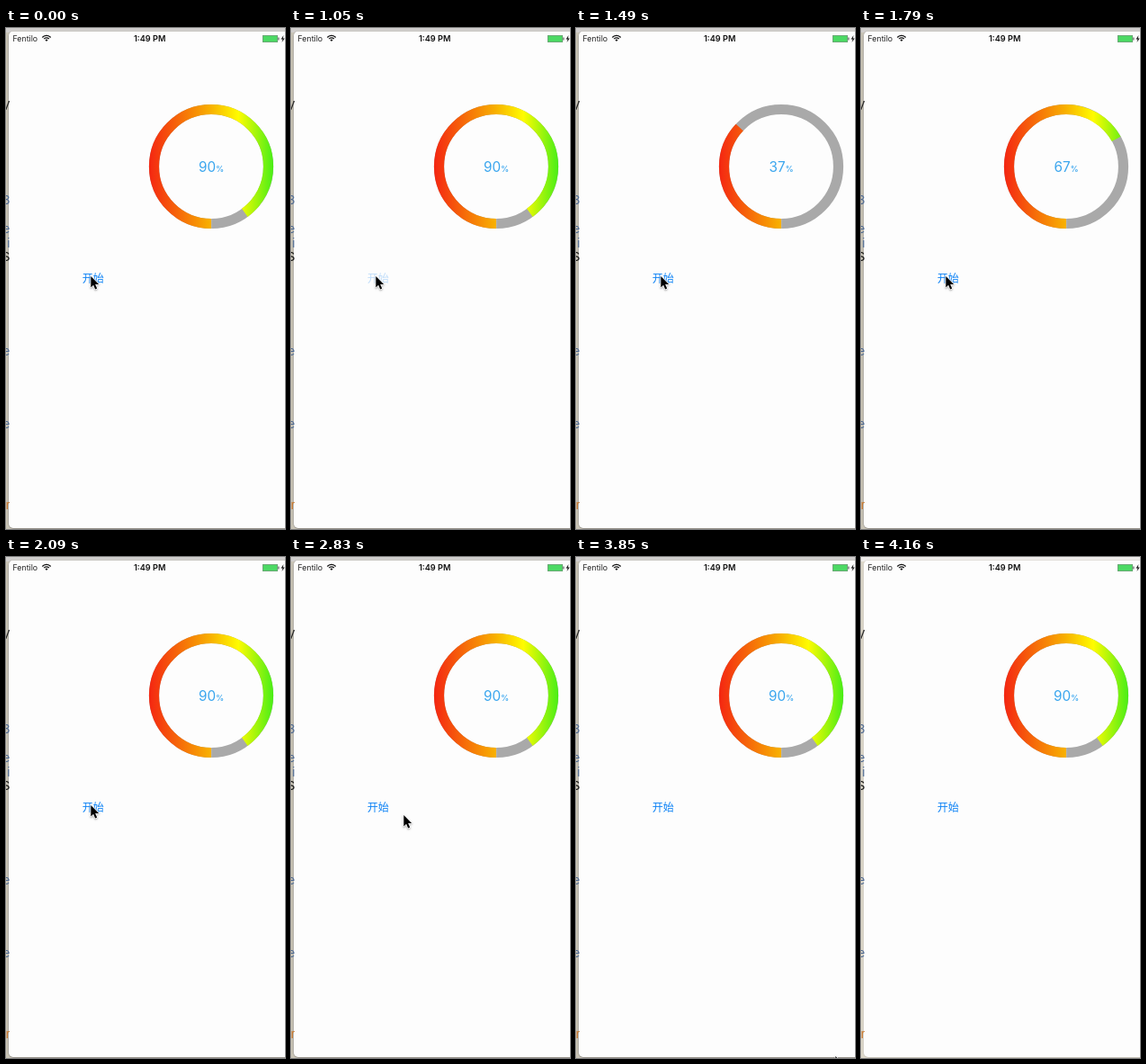
These frames come from a looping animation (310x557 px, 4260 ms). An HTML page with a canvas:

```html
<!DOCTYPE html>
<html lang="zh">
<head>
<meta charset="utf-8">
<title>Ring progress</title>
<style>
  html, body { margin: 0; width: 100%; height: 100%; overflow: hidden; background: #fdfdfd; }
  canvas { display: block; width: 310px; height: 557px; }
</style>
</head>
<body>
<canvas id="stage" width="310" height="557"></canvas>
<script>
const ctx = document.getElementById('stage').getContext('2d');
const W = 310, H = 557, LOOP = 4260;
const TAP = 1045, STEP = 147.4;   // first refresh and the pace of the rest, in ms
const LAST = 21;                  // refresh on which the window loses its shadow
const TAU = Math.PI * 2;
const SANS = 'Inter, Roboto, sans-serif';
const HAN = '"Noto Sans CJK SC", "Noto Sans CJK", sans-serif';
const RING = { x: 228, y: 154, r: 63.5, width: 11.2 };

// Pointer key points: refresh, x, y, ease-in power
const PATH = [
  [8, 92, 275], [11, 163, 298, 2], [12, 123, 286], [15, 96, 280],
  [16, 105, 291], [17, 213, 414], [18, 216, 465], [19, 286, 554]
];

const lerp = (a, b, k) => a + (b - a) * k;

function text(str, x, y, font, color, align = 'left') {
  ctx.font = font;
  ctx.fillStyle = color;
  ctx.textAlign = align;
  ctx.fillText(str, x, y);
}

function polygon(points) {
  ctx.beginPath();
  points.forEach(([x, y]) => ctx.lineTo(x, y));
  ctx.closePath();
}

function panel(x, y, h, radius, color) {
  ctx.fillStyle = color;
  ctx.beginPath();
  ctx.roundRect(x, y, W + 10, h, radius);
  ctx.fill();
}

function drawWindow(bright) {
  ctx.fillStyle = bright ? '#ddd8ca' : '#c9c4b6';
  ctx.fillRect(0, 0, W, H);
  ctx.fillStyle = bright ? '#eeecea' : '#d0cecd';
  ctx.fillRect(0, 0, W, 5);
  panel(2.4, 3, H - 3, 6, bright ? '#c6c2b8' : '#98948c');
  panel(3, 3.6, H - 4.6, 5, '#fdfdfd');

  // Slivers of the page behind
  const blue = '#4a6690';
  const slivers = [['V', 91, '#222'], ['3', 196, blue], ['e', 228, blue], ['i', 244, blue],
    ['S', 259, '#111'], ['e', 364, blue], ['e', 445, blue], ['r', 535, '#cc7a30']];
  ctx.save();
  ctx.beginPath();
  ctx.rect(0, 0, 4, H);
  ctx.clip();
  for (const [ch, y, color] of slivers) text(ch, 4.3, y, '14px "Liberation Sans", sans-serif', color, 'right');
  ctx.restore();
}

function drawStatusBar() {
  text('Fentilo', 7.5, 15, '8.8px ' + SANS, '#222');
  text('1:49 PM', 159.7, 15, '600 9.2px ' + SANS, '#111', 'center');

  // Signal fan
  const fan = r => ctx.arc(45, 14.6, r, -Math.PI * 0.77, -Math.PI * 0.23);
  ctx.strokeStyle = ctx.fillStyle = '#111';
  ctx.lineWidth = 1.3;
  for (const r of [3.7, 6.2]) {
    ctx.beginPath();
    fan(r);
    ctx.stroke();
  }
  ctx.beginPath();
  ctx.moveTo(45, 15);
  fan(2);
  ctx.fill();

  // Battery
  ctx.fillStyle = '#4cd964';
  ctx.fillRect(285, 8, 17, 8);
  ctx.strokeStyle = '#68a874';
  ctx.lineWidth = 1;
  ctx.strokeRect(285.5, 8.5, 16, 7);
  ctx.fillStyle = '#444';
  ctx.fillRect(302.4, 10.5, 1, 3);
  ctx.fillStyle = '#111';
  polygon([[308.5, 8], [305.5, 12.5], [307.5, 12.5], [306.5, 16], [309.7, 11.4], [307.7, 11.4]]);
  ctx.fill();
}

const rainbow = ctx.createLinearGradient(158, 0, 298, 0);
rainbow.addColorStop(0, '#f42412');
rainbow.addColorStop(0.5, '#f8b200');
rainbow.addColorStop(0.715, '#fffc00');
rainbow.addColorStop(1, '#44ee18');

function drawRing(percent) {
  const arc = (share, paint) => {
    ctx.beginPath();
    ctx.arc(RING.x, RING.y, RING.r, TAU / 4, TAU / 4 + TAU * share);
    ctx.strokeStyle = paint;
    ctx.stroke();
  };
  ctx.lineWidth = RING.width;
  arc(1, '#a9a9a9');
  arc(percent / 100, rainbow);

  const big = '15.3px ' + SANS, small = '600 8.8px ' + SANS, blue = '#3ba6ee';
  ctx.font = big;
  const bigWidth = ctx.measureText(percent).width;
  ctx.font = small;
  const x = RING.x - (bigWidth + ctx.measureText('%').width) / 2;
  text(percent, x, 159.6, big, blue);
  text('%', x + bigWidth, 159.6, small, blue);
}

function drawButton(alpha) {
  ctx.globalAlpha = alpha;
  text('开始', 96.8, 282.5, '12px ' + HAN, '#0a80f5', 'center');
  ctx.globalAlpha = 1;
}

function pointerAt(step) {
  const next = PATH.findIndex(p => p[0] >= step);
  if (next <= 0) return PATH[0].slice(1);
  const [s0, x0, y0] = PATH[next - 1];
  const [s1, x1, y1, power = 1] = PATH[next];
  const k = ((step - s0) / (s1 - s0)) ** power;
  return [lerp(x0, x1, k), lerp(y0, y1, k)];
}

function drawPointer([x, y]) {
  ctx.save();
  ctx.translate(x + 2.3, y + 0.9);
  ctx.scale(0.88, 0.9);
  polygon([[0, 0], [0, 14], [3.2, 11], [5.5, 16.2], [7.8, 15.2], [5.5, 10.2], [10, 10]]);
  ctx.shadowColor = 'rgba(0,0,0,.35)';
  ctx.shadowBlur = 2;
  ctx.shadowOffsetY = 1;
  ctx.lineJoin = 'round';
  ctx.lineWidth = 1.6;
  ctx.strokeStyle = '#fff';
  ctx.stroke();
  ctx.shadowColor = 'transparent';
  ctx.fillStyle = '#000';
  ctx.fill();
  ctx.restore();
}

function draw(now) {
  const step = Math.floor((now % LOOP - TAP) / STEP);
  const bright = step >= LAST;
  const running = step >= 1 && !bright;

  drawWindow(bright);
  drawStatusBar();
  drawRing(running ? Math.min(90, 15 * step - 8) : 90);
  drawButton(step < 0 ? 1 : Math.min(1, 0.25 + 0.3 * step));
  if (step <= PATH.at(-1)[0]) drawPointer(pointerAt(step));
}

const start = performance.now();
function tick() {
  draw(performance.now() - start);
  requestAnimationFrame(tick);
}
tick();
</script>
</body>
</html>
```
